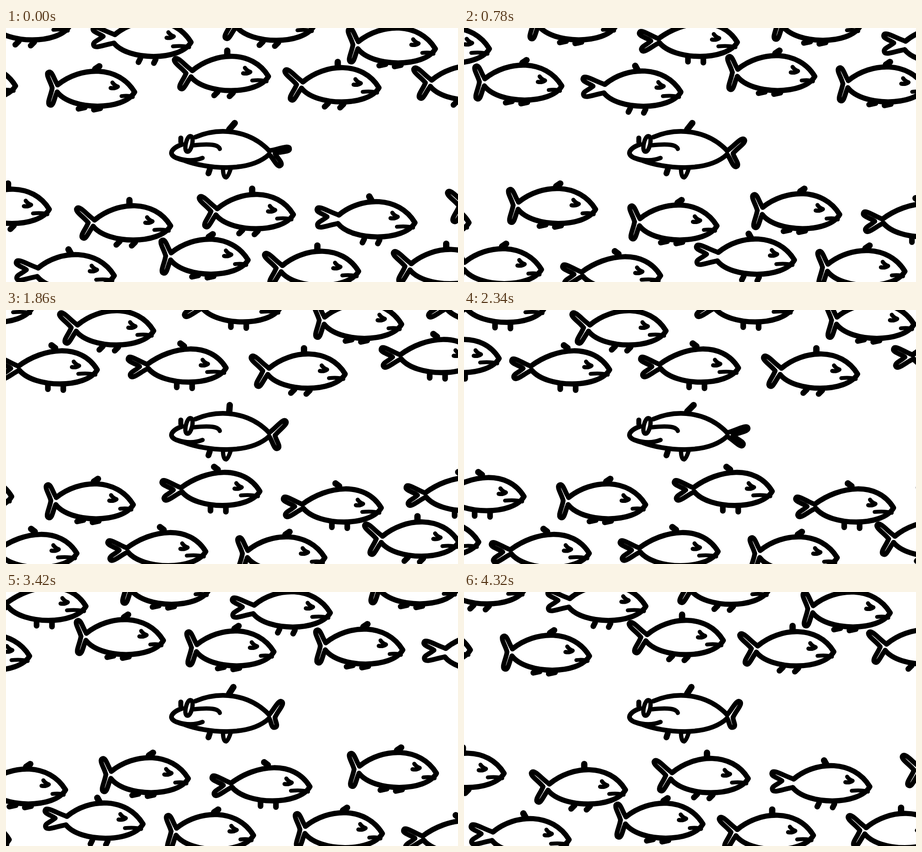
An HTML page for the animation above (4.38 s loop, 998 px wide and 561 px high).

```html
<!DOCTYPE html>
<html lang="en">
<head>
<meta charset="utf-8">
<title>Against the stream</title>
<style>
  html, body { margin: 0; width: 100%; height: 100%; overflow: hidden; background: #fff; }
  svg { display: block; width: 100vw; height: 100vh; }
  path { fill: none; stroke: #000; stroke-linecap: round; stroke-linejoin: round; }
</style>
</head>
<body>
<svg id="stage" viewBox="0 0 998 561"></svg>
<script>
const STEP = 60, STEPS = 73, SPEED = 15, SPAN = 1087;
const stage = document.getElementById('stage');

function add(parent, tag, attrs = {}) {
  const node = document.createElementNS('http://www.w3.org/2000/svg', tag);
  for (const name in attrs) node.setAttribute(name, attrs[name]);
  return parent.appendChild(node);
}

const ink = (group, width, d) => add(group, 'path', { d, 'stroke-width': width });

// Short fat stroke for a fin: starts at its tip and leans towards its root.
const dab = (group, width, x, y, dx, dy) => ink(group, width, `M${x},${y}l${dx},${dy}`);

// One tail lobe: from the body joint round the tip and back to the waist.
function lobe(group, joint, tip, waist) {
  const ease = p => [0, 1].map(i => p[i] + 0.4 * (tip[i] - p[i]));
  const axis = [0, 1].map(i => tip[i] - (joint[i] + waist[i]) / 2);
  const length = Math.hypot(...axis);
  const normal = [-axis[1] / length, axis[0] / length];
  const outward = (joint[0] - waist[0]) * normal[0] + (joint[1] - waist[1]) * normal[1];
  const round = side => [0, 1].map(i => tip[i] + 9 * side * Math.sign(outward) * normal[i]);
  ink(group, 10.5, `M${joint}C${ease(joint)} ${round(1)} ${tip}C${round(-1)} ${ease(waist)} ${waist}`);
}

// School poses; the origin is the tip of the snout.
const schoolPoses = [
  { joints: [[-174, -13], [-177, 1]], waist: [-188, -7], tips: [[-213, -39], [-200, 27]],
    mouth: -42, eye: [-53, -10], dorsal: [-97, -57, 0, 10], fin: [-126, 42, 8, -8] },
  { joints: [[-176, -16], [-177, 0]], waist: [-188, -9], tips: [[-196, -44], [-193, 29]],
    mouth: -35, eye: [-50, -12], dorsal: [-84, -57, -9, 6], fin: [-130, 37, 14, -3] },
  { joints: [[-174, -17], [-176, 2]], waist: [-200, -13], tips: [[-222, -31], [-221, 7]],
    mouth: -46, eye: [-51, -13], dorsal: [-107, -58, 5, 9], fin: [-122, 44, 4, -8] },
  { joints: [[-180, -8], [-178, 1]], waist: [-197, -3], tips: [[-222, -22], [-217, 18]],
    mouth: -48, eye: [-53, -9], dorsal: [-107, -54, 8, 6], fin: [-115, 43, 0, -8] }
];

function drawSchoolFish(group, { joints: [up, down], waist, tips, mouth, eye, dorsal, fin }) {
  ink(group, 11.5, `M${up}C-125,${up[1] - 41} -42,-60 -6,0C-30,42 -145,41 ${down}`);
  lobe(group, up, tips[0], waist);
  lobe(group, down, tips[1], waist);
  ink(group, 8.5, `M${mouth},9Q${mouth / 2},7 -10,11`);
  ink(group, 9, `M${eye}m-5,-9q4,6 12,9q-7,5 -16,3`);
  dab(group, 14, ...dorsal);
  const [x, y, dx, dy] = fin;
  dab(group, 12.5, x, y, dx, dy);
  dab(group, 12.5, x + 34, y + 2, dx, dy);
}

// Tail tips and the lean of the back fin; everything else keeps still.
const heroPoses = [
  { tips: [[626, 266], [606, 304]], lean: 12 },
  { tips: [[618, 245], [600, 306]], lean: 1 },
  { tips: [[609, 242], [594, 299]], lean: 9 },
  { tips: [[619, 246], [602, 306]], lean: 11 },
  { tips: [[627, 260], [616, 299]], lean: 14 }
];

function drawHero(group, { tips, lean }) {
  const up = [581, 271], down = [581, 279], waist = [594, 277];
  ink(group, 10.5, `M418,241C470,219 536,224 ${up}`);
  ink(group, 10.5, `M389,257C374,262 352,276 376,287Q386,291 395,293C440,310 536,321 ${down}`);
  ink(group, 9.5, 'M378,287Q408,297 434,287');
  ink(group, 9.5, 'M415,259Q468,253 472,267');
  ink(group, 9.5, 'M479,308Q479,330 486,330Q491,328 497,308');
  ink(group, 9.5, 'M408,239C399,236 391,271 400,273C409,276 417,241 408,239');
  dab(group, 11, 386, 243, 0, 9);
  dab(group, 13, 447, 321, 3, -9);
  dab(group, 14, 493 + lean, 210, -lean, 14);
  lobe(group, up, tips[0], waist);
  lobe(group, down, tips[1], waist);
}

// Snout x and y, starting pose above and below, distance down to the lower twin.
const pairs = [
  [146.5, -5, 0, 0], [414.5, 31.5, 2, 0], [685.5, -4, 0, 0, 416], [954, 46, 1, 2, 384],
  [27, 128, 0, 0], [290, 141.5, 1, 2], [585.5, 107, 0, 1], [829.5, 132, 0, 0]
];
const school = pairs.flatMap(([x, y, above, below, drop = 405.5]) => [
  { x, y, phase: above },
  { x: x - 45 + SPAN, y: y + drop, phase: below }
]);

const defs = add(stage, 'defs');
schoolPoses.forEach((pose, i) => drawSchoolFish(add(defs, 'g', { id: 'pose' + i }), pose));
for (const fish of school) fish.laps = [add(stage, 'use'), add(stage, 'use')];
const heroes = heroPoses.map(pose => {
  const group = add(stage, 'g');
  drawHero(group, pose);
  return group;
});

function render(time) {
  const step = Math.floor(time / STEP) % STEPS;
  for (const { x, y, phase, laps } of school) {
    const snout = (x + SPEED * step) % SPAN;
    laps.forEach((node, lap) => {
      node.setAttribute('href', '#pose' + (phase + step) % schoolPoses.length);
      node.setAttribute('transform', `translate(${snout + lap * SPAN} ${y})`);
    });
  }
  heroes.forEach((node, i) => node.setAttribute('display', i === step % heroes.length ? 'inline' : 'none'));
}

function tick() {
  render(performance.now());
  requestAnimationFrame(tick);
}
tick();
</script>
</body>
</html>
```
